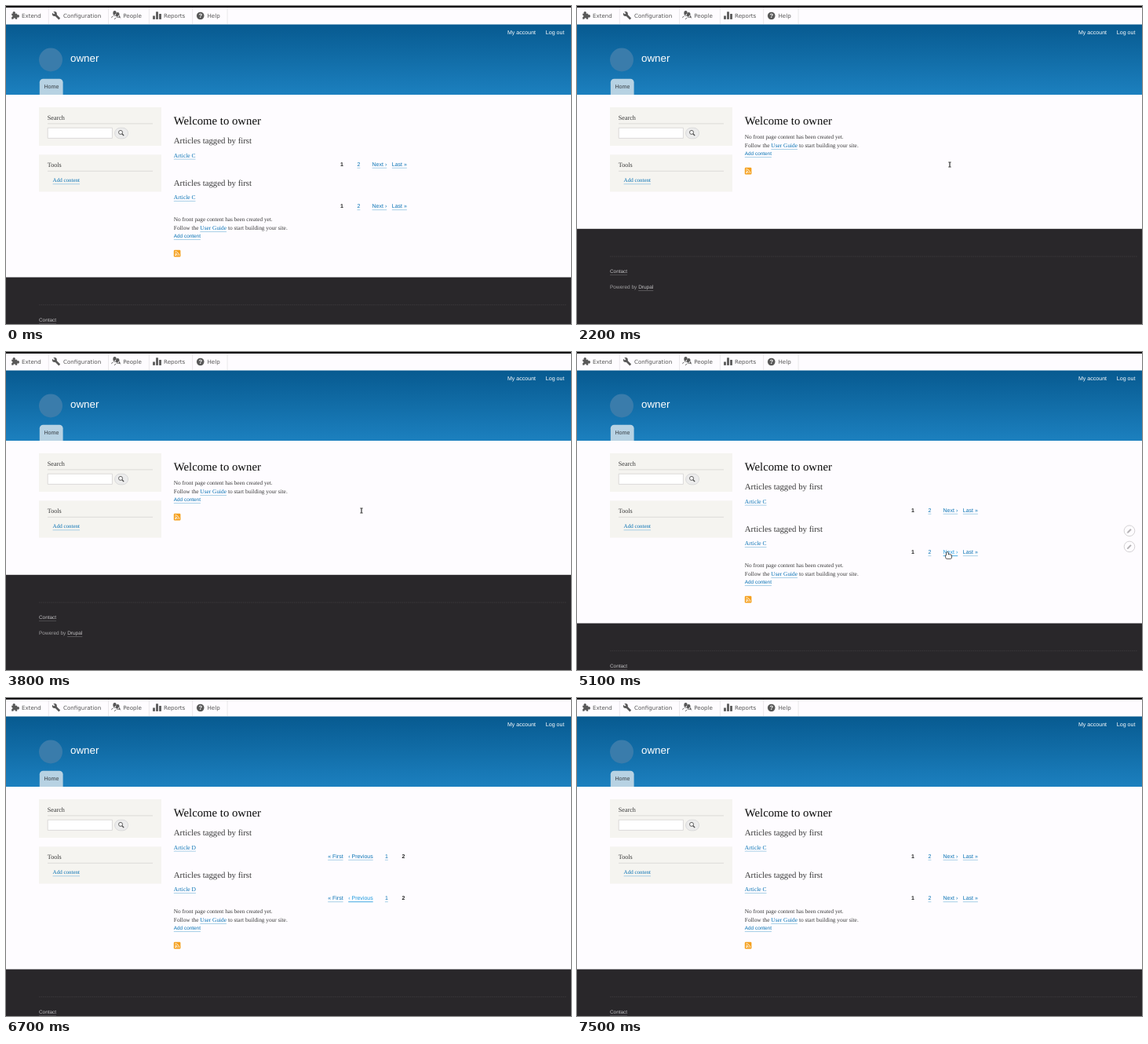
Recreate the animation shown at these times as an HTML page with a canvas. Size 720 by 405 pixels, loop 8.2 s.

```html
<!DOCTYPE html>
<html lang="en">
<head>
<meta charset="utf-8">
<title>Paged article lists</title>
<style>
html, body { margin: 0; width: 100%; height: 100%; overflow: hidden; background: #fefcff; }
canvas { display: block; width: 720px; height: 405px; }
</style>
</head>
<body>
<canvas id="stage"></canvas>
<script>
const LOOP = 8200, STEP = 100, W = 720, H = 405;
const SANS = '"Liberation Sans", sans-serif';
const SERIF = '"Liberation Serif", serif';
const MENU = '"DejaVu Sans", sans-serif';
const PAPER = '#fefcff', INK = '#3b3b3b', ICON = '#585858';
const LINK = '#0872b4', HOVER = '#1c98dd', RULE = '#95c6e2';
const LEFT = 213.8, PAGER_END = 514.2;

// Each click reloads the page; the lists follow after a short wait.
const CLICKS = [2100, 3800, 5200, 6800], WAIT = 300;
const POINTER = { from: 600, to: 6300, x: 473, y: 405 };
const MOVES = [
  { from: 600, to: 1200, x: 479.5, y: 203.5 },
  { from: 1400, to: 1700, x: 475, y: 202 },
  { from: 2600, to: 2900, x: 463.5, y: 198 },
  { from: 2900, to: 3200, x: 453, y: 202 },
  { from: 4300, to: 5000, x: 473.5, y: 259 },
  { from: 5500, to: 6000, x: 455, y: 256 }
];

const canvas = document.getElementById('stage');
const ctx = canvas.getContext('2d');
const ratio = window.devicePixelRatio || 1;
canvas.width = W * ratio;
canvas.height = H * ratio;
ctx.textRendering = 'geometricPrecision';

function paint(fill, stroke, width = 0.7) {
  if (fill) { ctx.fillStyle = fill; ctx.fill(); }
  if (stroke) { ctx.strokeStyle = stroke; ctx.lineWidth = width; ctx.stroke(); }
}

function rect(x, y, w, h, fill) {
  ctx.fillStyle = fill;
  ctx.fillRect(x, y, w, h);
}

function round(x, y, w, h, r, fill, stroke) {
  ctx.beginPath();
  ctx.roundRect(x, y, w, h, r);
  paint(fill, stroke);
}

function disc(x, y, r, fill, stroke, width) {
  ctx.beginPath();
  ctx.arc(x, y, r, 0, Math.PI * 2);
  paint(fill, stroke, width);
}

function line(x1, y1, x2, y2, color, width = 1) {
  ctx.beginPath();
  ctx.moveTo(x1, y1);
  ctx.lineTo(x2, y2);
  paint(null, color, width);
}

function at(x, y, drawPart) {
  ctx.save();
  ctx.translate(x, y);
  drawPart();
  ctx.restore();
}

function widthOf(str, size, family, weight = '') {
  ctx.font = `${weight} ${size}px ${family}`;
  return ctx.measureText(str).width;
}

function text(str, x, y, size, family, color, weight) {
  const w = widthOf(str, size, family, weight);
  ctx.fillStyle = color;
  ctx.fillText(str, x, y);
  return w;
}

function link(str, x, y, size, family, color = LINK, rule = RULE) {
  const w = text(str, x, y, size, family, color);
  rect(x, y + 2, w, 0.8, rule);
  return w;
}

function pageAt(t) {
  const loads = CLICKS.filter(c => c <= t);
  const since = loads.length ? loads[loads.length - 1] + WAIT : 0;
  return { number: t < since ? 0 : 1 + loads.length % 2, age: t - since };
}

function pointerAt(t) {
  let { x, y } = POINTER;
  for (const m of MOVES) {
    const k = Math.min(1, Math.max(0, (t - m.from) / (m.to - m.from)));
    const e = k * k * (3 - 2 * k);
    x += (m.x - x) * e;
    y += (m.y - y) * e;
  }
  return { x, y };
}

// Icons are drawn around their own centre.
function puzzle() {
  rect(-4, -2.8, 7, 7, ICON);
  disc(-1, -3.8, 1.7, ICON);
  disc(4, 0.4, 1.8, ICON);
  disc(-0.5, 4, 1.2, PAPER);
  disc(-4, 0.4, 1.2, PAPER);
}

function wrench() {
  disc(-2.4, -2.4, 3, ICON);
  line(-6, -6, -2.6, -2.6, PAPER, 2);
  line(-1.5, -1.5, 4, 4, ICON, 2.6);
}

function person() {
  ctx.beginPath();
  ctx.ellipse(0, 5, 4.4, 3, 0, Math.PI, 0);
  ctx.ellipse(0, -1.5, 2.2, 2.9, 0, 0, Math.PI * 2);
  paint(ICON);
}

function people() {
  at(-2, -2, person);
  line(-2, 1.8, -0.6, 0.4, PAPER);
  at(1.8, 0, person);
}

function bars() {
  [4.4, 9.6, 6.9].forEach((h, i) => rect(4 * i - 5.2, 4.4 - h, 2.8, h, ICON));
}

function help() {
  disc(0, 0, 4.8, ICON);
  text('?', -2.3, 2.9, 7.6, SANS, '#fff', 'bold');
}

function toolbar() {
  rect(0, 0, W, 2, '#100d12');
  const items = { Extend: puzzle, Configuration: wrench, People: people, Reports: bars, Help: help };
  let x = 1.2;
  for (const [label, icon] of Object.entries(items)) {
    at(x + 10, 12.5, icon);
    x += 18.8 + text(label, x + 18.8, 15.4, 7.1, MENU, '#555') + 9.4;
    rect(x - 0.4, 2, 0.8, 21, '#e6e4e7');
  }
}

function header() {
  const sky = ctx.createLinearGradient(0, 23, 0, 113);
  sky.addColorStop(0, '#075a90');
  sky.addColorStop(1, '#1c80bf');
  rect(0, 23.5, W, 89.5, sky);
  text('My account', 639, 36.3, 7.05, SANS, '#fff');
  text('Log out', 687.8, 36.3, 7.1, SANS, '#fff');
  disc(57, 68.5, 15, '#3a7cab');
  text('owner', 82, 71.3, 13.4, SANS, '#fff');
  round(42.8, 92.8, 29.8, 20.2, [4.5, 4.5, 0, 0], '#b7d2e3');
  text('Home', 48.4, 105, 7.1, SANS, '#353b40');
}

function panel(title, y, h) {
  rect(42, y, 156, h, '#f5f4f0');
  text(title, 52.8, y + 16, 8.15, SERIF, '#383838');
  rect(53, y + 20.5, 134, 0.8, '#d6d5d2');
}

function sidebar() {
  panel('Search', 129, 49);
  panel('Tools', 189.3, 47.2);
  round(53.2, 155.2, 82.2, 13.2, 0, '#fff', '#cfcdcd');
  round(138.6, 155.2, 17, 13.6, 6.8, '#ececec', '#d0d0d2');
  disc(146, 160.9, 2.5, '#f6f6f6', '#555', 0.9);
  line(147.9, 162.8, 150.2, 165.1, '#444', 1.3);
  link('Add content', 59.6, 224.4, 7, SERIF);
}

function feedIcon(x, y) {
  round(x, y, 8.6, 8.6, 1.2, '#f5a01e');
  disc(x + 2.3, y + 6.4, 0.9, '#fff');
  for (const r of [3, 5.2]) {
    ctx.beginPath();
    ctx.arc(x + 1.6, y + 7.1, r, -Math.PI / 2, 0);
    paint(null, '#fff', 0.9);
  }
}

function pencil(y) {
  disc(704, y, 6.8, PAPER, '#c9c7ca', 0.8);
  line(701.7, y + 2.3, 706, y - 2, '#b4b2b5', 2);
  line(700.9, y + 3.1, 702, y + 2, '#b4b2b5');
}

// Links are laid out from the right; the current page is bold and not a link.
function pager(page, y, pointer) {
  const labels = page === 1 ? ['1', '2', 'Next ›', 'Last »'] : ['« First', '‹ Previous', '1', '2'];
  let x = PAGER_END, hit = false;
  for (const label of labels.reverse()) {
    const current = label === String(page);
    const pad = current ? 5.8 : label.length === 1 ? 11.9 : 3.3;
    const w = widthOf(label, 7, SANS, current ? 'bold' : '');
    x -= pad + w;
    if (current) {
      text(label, x, y, 7, SANS, '#222', 'bold');
    } else {
      const over = pointer.x >= x && pointer.x <= x + w + 1 && Math.abs(pointer.y - y) < 4.5;
      link(label, x, y, 7, SANS, over ? HOVER : LINK, over ? HOVER : RULE);
      hit = hit || over;
    }
    x -= pad;
  }
  return hit;
}

function list(page, y, pointer) {
  text('Articles tagged by first', LEFT, y, 10.8, SERIF, INK);
  link('Article ' + (page === 1 ? 'C' : 'D'), LEFT, y + 17.3, 7.5, SERIF);
  return pager(page, y + 28.4, pointer);
}

function emptyNote(y) {
  text('No front page content has been created yet.', LEFT, y, 7.28, SERIF, INK);
  let x = LEFT;
  x += text('Follow the ', x, y + 11, 7.37, SERIF, INK);
  x += link('User Guide', x, y + 11, 7.37, SERIF);
  text(' to start building your site.', x, y + 11, 7.37, SERIF, INK);
  link('Add content', LEFT, y + 21.2, 6.4, SANS);
  feedIcon(LEFT, y + 36.8);
}

function footer(y) {
  rect(0, y, W, H - y, '#29272a');
  ctx.setLineDash([1.5, 1]);
  line(42, y + 35.2, 714, y + 35.2, '#403e41', 0.8);
  ctx.setLineDash([]);
  link('Contact', 42, y + 56.3, 6.4, SANS, '#c4c3c5', '#555356');
  const w = text('Powered by ', 42, y + 76.3, 6.5, SANS, '#a2a1a3');
  link('Drupal', 42 + w, y + 76.3, 6.5, SANS, '#c4c3c5', '#626063');
}

function arrow() {
  ctx.beginPath();
  ctx.moveTo(0, 0);
  ctx.lineTo(0, 8.5);
  ctx.lineTo(6, 6);
  ctx.closePath();
  paint('#222', '#fff');
}

function beam() {
  line(0, -3, 0, 3, '#333', 1.2);
  for (const y of [-3, 3]) line(-1.7, y, 1.7, y, '#333', 0.9);
}

function hand() {
  ctx.beginPath();
  ctx.roundRect(-2.4, -4, 1.8, 6, 0.9);
  ctx.roundRect(-3.4, -0.8, 7, 4.8, 1.6);
  paint(null, '#333', 1.6);
  paint('#fff');
}

function draw(t) {
  const page = pageAt(t), pointer = pointerAt(t);
  const shown = t >= POINTER.from && t < POINTER.to;
  const listed = page.number > 0;
  let onLink = false;

  ctx.setTransform(ratio, 0, 0, ratio, 0, 0);
  rect(0, 0, W, H, PAPER);
  toolbar();
  header();
  sidebar();
  text('Welcome to owner', LEFT, 150.8, 14.75, SERIF, '#080808');
  emptyNote(listed ? 274 : 169);
  footer(listed ? 345.5 : 283.8);

  for (const top of listed ? [165, 218.5] : []) {
    const hit = list(page.number, top + 10.4, pointer);
    onLink = onLink || hit;
    const inside = pointer.y > top && pointer.y < top + 47;
    if (shown && inside && page.number === 1 && page.age >= 200) {
      pencil(top + 9.2);
      pencil(top + 29.4);
    }
  }
  if (shown) at(pointer.x, pointer.y, onLink ? hand : pointer.y < 264 ? beam : arrow);
}

const start = performance.now();
function tick() {
  const t = (performance.now() - start) % LOOP;
  draw(Math.floor(t / STEP) * STEP);
  requestAnimationFrame(tick);
}
tick();
</script>
</body>
</html>
```
